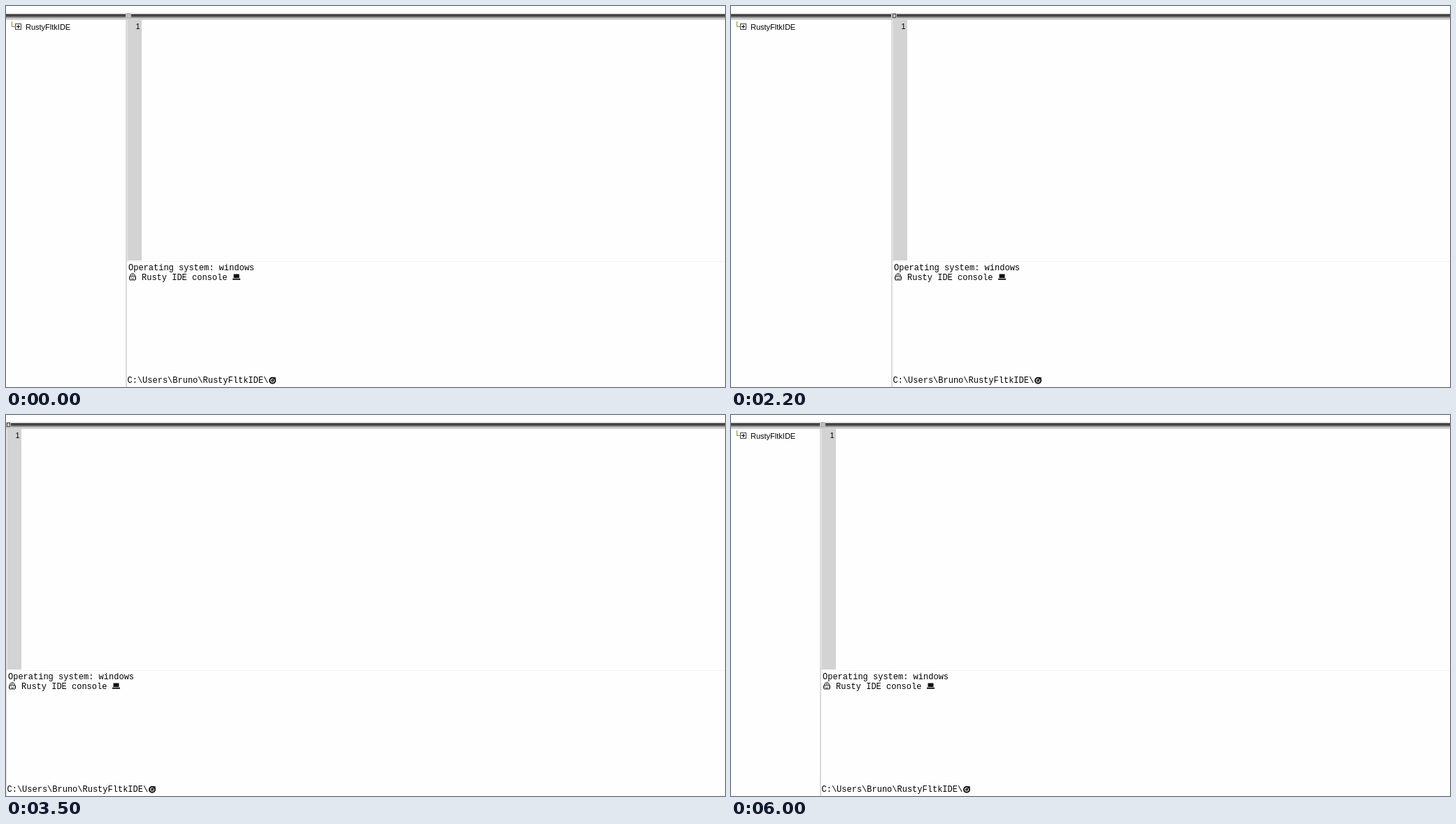
These frames come from a looping animation (1028x545 px, 6100 ms). An HTML page:

```html
<!DOCTYPE html>
<html lang="en">
<head>
<meta charset="utf-8">
<title>IDE splitter</title>
<style>
  html, body { margin: 0; width: 100%; height: 100%; overflow: hidden; background: #fefefe; }
  svg { display: block; width: 1028px; height: 545px; }
  text { white-space: pre; fill: #000; }
  .sans { font: 11px "Liberation Sans", Arial, sans-serif; }
  .mono { font: 12px "Liberation Mono", "Courier New", monospace; }
</style>
</head>
<body>
<svg viewBox="0 0 1028 545" xmlns="http://www.w3.org/2000/svg">
  <rect width="1028" height="545" fill="#fefefe"/>

  <!-- project tree -->
  <g shape-rendering="crispEdges" fill="none">
    <path d="M8.5 22V29.5H13" stroke="#8c8c30"/>
    <rect x="13.5" y="25.5" width="8" height="8" fill="#fff" stroke="#444"/>
    <path d="M15 29.5H20M17.5 27V32" stroke="#000"/>
  </g>
  <text class="sans" x="28" y="34">RustyFltkIDE</text>

  <!-- header bar -->
  <g shape-rendering="crispEdges">
    <rect y="10" width="1028" height="10" fill="#c3c3c3"/>
    <rect y="10" width="1028" height="1" fill="#dcdcdc"/>
    <rect y="12" width="1028" height="4" fill="#222"/>
    <rect y="14" width="1028" height="1" fill="#a0a0a0"/>
    <rect y="19" width="1028" height="1" fill="#d8d8d8"/>
  </g>

  <!-- everything right of the splitter -->
  <g id="pane">
    <g shape-rendering="crispEdges">
      <rect y="20" width="1028" height="525" fill="#fefefe"/>
      <rect x="-1" y="20" width="2" height="525" fill="#dadada"/>
      <rect x="1" y="20" width="1" height="345" fill="#e4e4e4"/>
      <rect x="2" y="20" width="20" height="344" fill="#d3d3d3"/>
      <rect x="1" y="365" width="1028" height="1" fill="#f3f3f3"/>
      <rect x="-1" y="10" width="8" height="8" fill="#c6c6c6"/>
      <rect id="grip" x="1.5" y="11.5" width="4" height="5" fill="#d8d8d8"/>
      <path d="M3.5 13V15" stroke="#999"/>
    </g>
    <text class="sans" x="19.5" y="33" text-anchor="end">1</text>
    <g class="mono">
      <text x="3" y="377.5">Operating system: windows</text>
      <text x="22" y="391.5">Rusty IDE console</text>
      <text x="1.5" y="539">C:\Users\Bruno\RustyFltkIDE\</text>
    </g>
    <!-- face icon -->
    <g fill="none" stroke="#222">
      <path d="M5.5 387Q5.5 382.5 9 382.5T12.5 387M5 386.5H13V392H5ZM4.5 387V391M13.5 387V391"/>
      <path d="M7 388.5H8M10 388.5H11M7 390.7H11M7.5 384.5H10.5" stroke-width=".9"/>
    </g>
    <!-- laptop icon -->
    <path d="M153.5 383.5H161.5V389H153.5ZM152 389.8H163V391.8H152Z" fill="#111"/>
    <!-- target icon -->
    <g fill="none" stroke="#111">
      <circle cx="209" cy="535.7" r="4" stroke-width="2"/>
      <circle cx="209" cy="535.7" r="1.4" stroke-width="1.3"/>
      <path d="M209 535.7L213.5 531.2M211.5 531V533.2H213.8" stroke-width="1.2"/>
    </g>
  </g>
</svg>
<script>
  const LOOP = 6100, STEP = 100, START_X = 172, MIN_X = 95;
  const linear = p => p;
  const smooth = p => p * p * (3 - 2 * p);

  // pointer strokes, resting in between
  const strokes = [
    { from: 800, to: 1500, x: 83 },
    { from: 1600, to: 1800, x: 161 },
    { from: 1800, to: 2500, x: 281, ease: linear },
    { from: 2600, to: 2700, x: 292 },
    { from: 2785, to: 3300, x: 95 },
    { from: 3400, to: 3500, x: 83 },
    { from: 4400, to: 4500, x: 95 },
    { from: 4600, to: 4700, x: 107 },
    { from: 4800, to: 5000, x: 128 }
  ];
  const pane = document.getElementById("pane");
  const grip = document.getElementById("grip");

  function pointerAt(t) {
    let pos = START_X;
    for (const { from, to, x, ease = smooth } of strokes) {
      const p = Math.min(1, Math.max(0, (t - from) / (to - from)));
      pos += (x - pos) * ease(p);
    }
    return Math.round(pos);
  }

  // the pane moves in hard steps and snaps shut below its minimum width
  function draw(t) {
    const x = pointerAt(Math.floor(t / STEP) * STEP);
    const hovered = t >= 700 && t < 6000;
    pane.setAttribute("transform", `translate(${x < MIN_X ? 0 : x} 0)`);
    grip.setAttribute("stroke", hovered ? "#444" : "#a4a4a4");
  }

  const begin = performance.now();
  function tick() {
    draw((performance.now() - begin) % LOOP);
    requestAnimationFrame(tick);
  }
  draw(0);
  requestAnimationFrame(tick);
</script>
</body>
</html>
```
